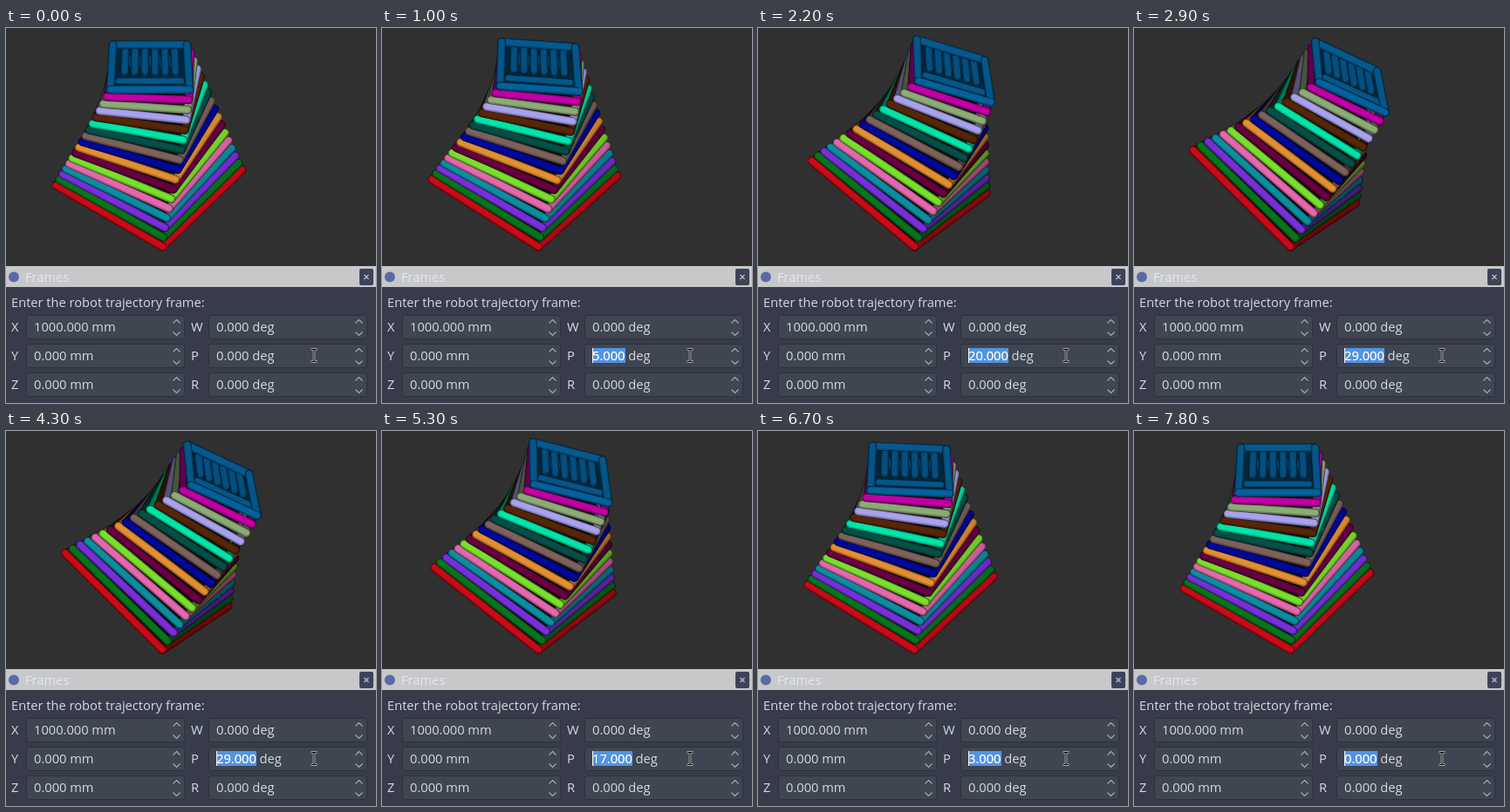
Write an HTML page with a canvas that moves like this. It is 424 px wide and 430 px high and loops after 8 s.

```html
<!DOCTYPE html>
<html lang="en">
<head>
<meta charset="utf-8">
<title>Frames</title>
<style>
  html, body { margin: 0; width: 100%; height: 100%; overflow: hidden; background: #303030; }
  canvas, svg { position: absolute; left: 0; top: 0; display: block; }
  text { font: 14.67px "Open Sans", "Noto Sans", sans-serif; fill: #d3dae3; white-space: pre; }
  .field { fill: #404552; stroke: #2d313d; }
  .arrow { fill: none; stroke: #a4abb8; stroke-width: 1.1; }
</style>
</head>
<body>
<canvas id="view" width="424" height="273"></canvas>
<svg width="424" height="430" viewBox="0 0 424 430">
  <defs><path id="beam" d="M349.5 368.5h2.5l1 1 1-1h2.5M353 369v13M349.5 382.5h2.5l1-1 1 1h2.5" fill="none"/></defs>
  <rect y="273" width="424" height="157" fill="#383c4a"/>
  <rect y="273" width="424" height="24" fill="#c6c8ca"/>
  <circle cx="9" cy="285.5" r="6" fill="#5b6aa6"/>
  <text x="22" y="291" style="fill:#e6e8eb">Frames</text>
  <rect x="405" y="276" width="16" height="19" rx="2" fill="#3c4358"/>
  <path d="M410.5 283l5 5m0-5l-5 5" stroke="#b9c0cc" stroke-width="1.2"/>
  <text x="6" y="320">Enter the robot trajectory frame:</text>
  <g id="fields"></g>
  <rect id="mark" x="241" y="367" width="46" height="17" fill="#5294e2"/>
  <text id="pitch" x="241" y="381"></text>
  <text id="picked" x="241" y="381" style="fill:#fff"></text>
  <rect id="caret" x="241" y="367" width="1" height="17" fill="#fff"/>
  <use href="#beam" stroke="#fff" stroke-width="2.4"/>
  <use href="#beam" stroke="#111" stroke-width="1.3"/>
</svg>
<script>
const LOOP = 8000, TICK = 100, TOP = 16;
const $ = id => document.getElementById(id);
const ctx = $('view').getContext('2d');

// Pitch in degrees at key ticks, stepped linearly in between.
const KEYS = [[5, 0], [14, 9], [16, 12], [22, 20], [23, 20], [29, 29], [31, 31], [40, 31], [43, 29],
  [53, 17], [63, 6], [64, 6], [67, 3], [69, 3], [70, 2], [73, 2], [74, 1], [77, 1], [78, 0]];

const COLORS = ['#d20a18', '#087a1e', '#7c32e2', '#0d94a8', '#ec6cb4', '#7ee82e', '#6c0042',
  '#ee9434', '#0008a0', '#82655f', '#06524a', '#00eeb0', '#5a2808', '#b0a8f6', '#92b27a',
  '#c800ac', '#045e96'].map(c => [1, 3, 5].map(i => parseInt(c.slice(i, i + 2), 16)));

const rad = deg => deg * Math.PI / 180;
const AXIS = rad(7), TILT = rad(39.5), DIST = 1000, HEIGHT = 165, EYE = 84;

// Tilt a point about the pitch axis, then project it.
function project(x, y, z, pitch) {
  const ca = Math.cos(AXIS), sa = Math.sin(AXIS), cp = Math.cos(pitch), sp = Math.sin(pitch);
  const along = x * sa + y * ca, across = x * ca - y * sa;
  const turned = across * cp + z * sp, up = z * cp - across * sp - EYE;
  const px = turned * ca + along * sa, py = along * ca - turned * sa;
  const c = Math.cos(TILT), q = Math.sin(TILT);
  const k = DIST / (DIST - c * py - q * up);
  return [165 + px * k, 110 + (q * py - c * up) * k];
}

// Square layers shrink and twist on the way up.
function layer(i, deg) {
  const t = i / TOP, size = 113 * 0.52 ** t, twist = rad(7 + 38 * t ** 1.4);
  const a = size * Math.sin(twist), b = size * Math.cos(twist);
  const at = (x, y) => project(x, y, HEIGHT * t, rad(deg));
  return { front: at(a, b), right: at(b, -a), back: at(-a, -b), left: at(-b, a) };
}

const mix = (a, b, t) => [a[0] + (b[0] - a[0]) * t, a[1] + (b[1] - a[1]) * t];
const tone = (c, k) => `rgb(${c.map(v => Math.min(255, Math.round(v * k))).join()})`;

function line(a, b, width, color, dy = 0) {
  ctx.lineWidth = width;
  ctx.strokeStyle = color;
  ctx.beginPath();
  ctx.moveTo(a[0], a[1] + dy);
  ctx.lineTo(b[0], b[1] + dy);
  ctx.stroke();
}

function bar(a, b, color, light = 1, width = 9.4) {
  line(a, b, width + 0.4, tone(color, light * 0.3));
  line(a, b, width - 0.8, tone(color, light * 0.74));
  line(a, b, width * 0.64, tone(color, light * 0.96), -0.4);
}

function fill(points, color) {
  ctx.fillStyle = color;
  ctx.beginPath();
  points.forEach(p => ctx.lineTo(p[0], p[1]));
  ctx.fill();
}

function drawLid({ front, left, right, back }) {
  const blue = COLORS[TOP];
  const at = (u, v) => mix(mix(left, front, u), mix(back, right, u), v);
  const u = i => 0.17 + i * 0.132;
  fill([front, left, back, right], tone(blue, 0.4));
  for (let i = 0; i < 6; i++) {
    if (i < 5) bar(at(u(i), 0.86), at(u(i + 1), 0.4), blue, 0.72, 7);
    bar(at(u(i), 0.4), at(u(i), 0.86), blue, 0.88, 9);
  }
  bar(at(0.1, 0.19), at(0.9, 0.19), blue, 0.95, 8);
  bar(back, right, blue);
  bar(back, left, blue, 0.95);
  bar(right, front, blue, 0.95);
  bar(left, front, blue, 1.08);
}

function drawStack(pitch) {
  ctx.fillStyle = '#303030';
  ctx.fillRect(0, 0, 424, 273);
  ctx.lineCap = 'round';
  const layers = COLORS.map((_, i) => layer(i, pitch));
  const chain = name => layers.map(l => l[name]);
  const lower = layers.slice(0, TOP);

  lower.forEach((l, i) => bar(l.left, l.back, COLORS[i], 0.5, 8));
  for (const side of ['right', 'left'])
    fill([...chain(side), ...chain('front').reverse()], '#0c0c0c');

  const dim = 0.94 - 0.013 * pitch;
  lower.forEach((l, i) => {
    bar(l.right, l.front, COLORS[i], dim);
    bar(l.left, l.front, COLORS[i]);
  });
  drawLid(layers[TOP]);
}

function buildFields() {
  const rows = [['X', '1000.000 mm', 'W', '0.000 deg'], ['Y', '0.000 mm', 'P', ''], ['Z', '0.000 mm', 'R', '0.000 deg']];
  $('fields').innerHTML = rows.map((row, r) => [0, 1].map(c => {
    const x = c ? 232.5 : 23.5, y = 329.5 + r * 33, ax = x + 168;
    return `<text x="${c ? 212 : 6}" y="${y + 18.5}">${row[c * 2]}</text>
      <rect class="field" x="${x}" y="${y}" width="181" height="27" rx="3"/>
      <text x="${x + 8.5}" y="${y + 18.5}">${row[c * 2 + 1]}</text>
      <path class="arrow" d="M${ax} ${y + 9}l4-4 4 4M${ax} ${y + 19}l4 4 4-4"/>`;
  }).join('')).join('');
}

function pitchAt(t) {
  const tick = Math.floor(t / TICK);
  const i = KEYS.findIndex(k => k[0] > tick);
  if (i <= 0) return 0;
  const [t0, p0] = KEYS[i - 1], [t1, p1] = KEYS[i];
  return Math.round(p0 + (p1 - p0) * (tick - t0) / (t1 - t0));
}

let shown = -1;
function render(t) {
  const pitch = pitchAt(t), active = t >= 600;
  if (pitch !== shown) {
    shown = pitch;
    drawStack(pitch);
    const num = pitch.toFixed(3);
    $('pitch').textContent = num + ' deg';
    $('picked').textContent = num;
    $('mark').setAttribute('width', pitch > 9 ? 46 : 38);
  }
  const blink = [3600, 7100].some(s => t >= s && t < s + 500);
  $('mark').style.display = $('picked').style.display = active ? '' : 'none';
  $('caret').style.display = active && !blink ? '' : 'none';
}

buildFields();
render(0);
const began = performance.now();
(function tick() {
  render((performance.now() - began) % LOOP);
  requestAnimationFrame(tick);
})();
</script>
</body>
</html>
```
